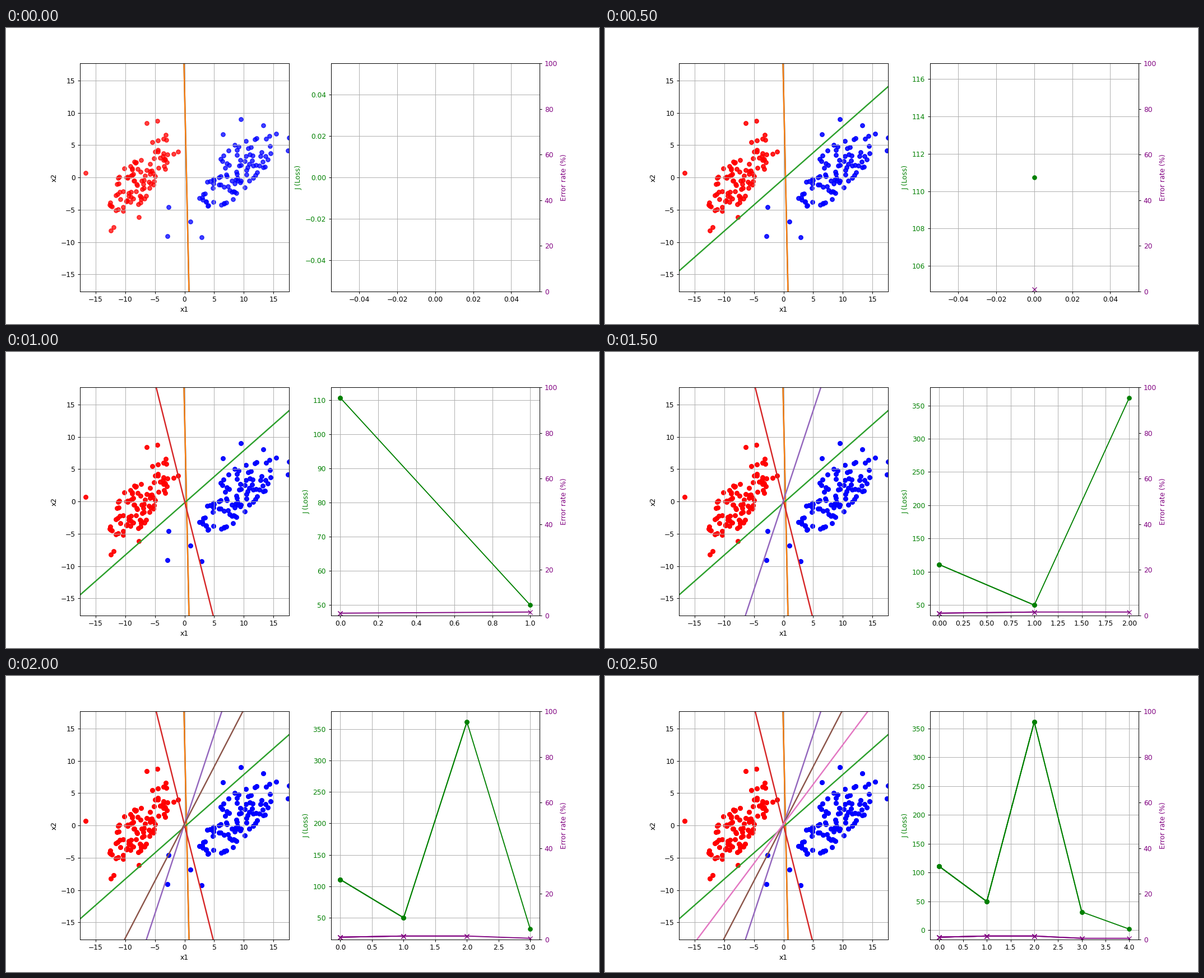
A matplotlib script that plays this animation: 1058 px wide and 529 px high, repeating every 3000 ms.

```python
import matplotlib.pyplot as plt
import numpy as np
from matplotlib.animation import FuncAnimation

LIMIT = 17.63
STEPS = 6
CLASS_SIZE = 100
LOSS = [110.73, 49.9, 361.4, 31.9, 2.1]
ERROR = [1, 1.5, 1.5, 0.5, 0.5]

# Decision boundary of each step: where it crosses the x1 axis, and its slope.
BOUNDARIES = [(0.325, -41.5), (0.25, 0.808), (0.015, -3.67),
              (-0.08, 2.772), (-0.15, 1.767), (-0.2, 1.224)]

RED_OUTLIERS = [(-16.7, 0.7), (-6.35, 8.45), (-4.6, 8.75), (-3.2, 6.6),
                (-1.9, 3.65), (-1.1, 4), (-7.7, -6.1), (-12, -7.7),
                (-12.45, -8.2)]
BLUE_OUTLIERS = [(9.5, 9), (13.3, 8.05), (15.45, 6.75), (LIMIT, 6.15),
                 (17.4, 4.15), (6.45, 6.7), (1, -6.8), (2.9, -9.25),
                 (-2.9, -9.05), (-2.7, -4.6)]

rng = np.random.default_rng(4)


def make_class(outliers, center, width, slope, height):
    """A tilted elliptical cloud, denser in the middle, plus outliers."""
    count = CLASS_SIZE - len(outliers)
    radius = rng.random(count) ** 0.6
    angle = rng.uniform(0, 2 * np.pi, count)
    dx = width * radius * np.cos(angle)
    dy = slope * dx + height * radius * np.sin(angle)
    return np.vstack([outliers, np.column_stack([dx, dy]) + center])


red = make_class(RED_OUTLIERS, (-7.5, 0.2), width=5.2, slope=0.8, height=4.2)
blue = make_class(BLUE_OUTLIERS, (8.8, 1.1), width=6.3, slope=0.65, height=4.2)

fig = plt.figure(figsize=(12, 6), dpi=88.17)


def draw_classes(ax, step):
    # The first step is painted twice, so the dots build up opacity.
    for i, shown in enumerate([0, *range(step + 1)]):
        ax.scatter(*red.T, color="red", alpha=0.5)
        ax.scatter(*blue.T, color="blue", alpha=0.5)
        crossing, slope = BOUNDARIES[shown]
        ax.axline((crossing, 0), slope=slope, color=f"C{i}", lw=2)
    ax.set(xlim=(-LIMIT, LIMIT), ylim=(-LIMIT, LIMIT), xlabel="x1", ylabel="x2")
    ax.grid(True)


def label_axis(ax, text, color):
    ax.set_ylabel(text, color=color)
    ax.tick_params(axis="y", labelcolor=color)


def draw_history(ax, step):
    twin = ax.twinx()
    for n in range(step + 1):
        ax.plot(range(n), LOSS[:n], "o-", color="green")
        twin.plot(range(n), ERROR[:n], "x-", color="purple")
    ax.grid(True)
    twin.set_ylim(0, 100)
    label_axis(ax, "J (Loss)", "green")
    label_axis(twin, "Error rate (%)", "purple")


def draw(step):
    fig.clear()
    left, right = fig.subplots(1, 2)
    draw_classes(left, step)
    draw_history(right, step)


anim = FuncAnimation(fig, draw, frames=STEPS, interval=500, repeat=True)
plt.show()
```
